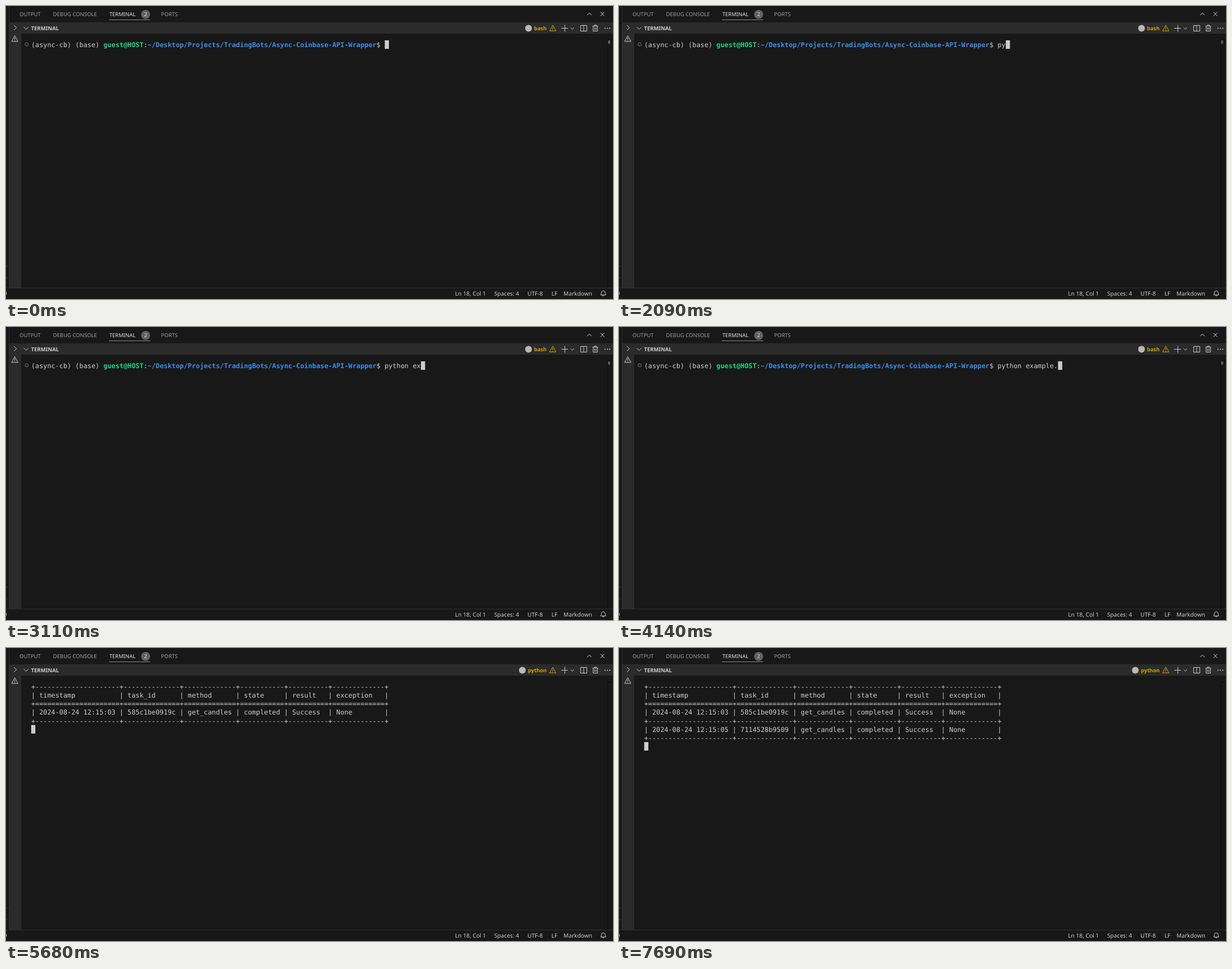
Recreate the animation shown at these times as an HTML page. Size 1078 by 520 pixels, loop 8000 ms.

```html
<!DOCTYPE html>
<html lang="en">
<head>
<meta charset="utf-8">
<title>Terminal session</title>
<style>
  html, body { margin: 0; width: 100%; height: 100%; overflow: hidden; background: #181818; }
  svg { display: block; width: 100vw; height: 100vh; }
  text { font-family: "Noto Sans", "Open Sans", sans-serif; text-rendering: geometricPrecision; white-space: pre; fill: #ccc; }
  .tabs text { font-size: 9.5px; fill: #9d9d9d; }
  .tabs .active { fill: #e0e0e0; }
  .title, .task text { font-size: 9.5px; font-weight: 700; }
  .task text { font-size: 9.3px; fill: #cca700; text-anchor: end; }
  .status text { font-size: 10.16px; }
  .screen text { font-family: "DejaVu Sans Mono", monospace; font-size: 11.853px; }
  .host { fill: #23d18b; font-weight: 700; }
  .path { fill: #3b8eea; font-weight: 700; }
  .icon { fill: none; stroke: #ccc; stroke-width: 1; }
  .yellow { stroke: #cca700; }
</style>
</head>
<body>
<svg viewBox="0 0 1078 520">
  <defs>
    <path id="warn" d="M0-5.3L5.6 4.9H-5.6ZM0-2V1.7M0 2.7V3.8" stroke-linejoin="round"/>
  </defs>

  <!-- panel frame -->
  <rect width="1078" height="520" fill="#181818"/>
  <path d="M5.5 0V500M0 500.5H1078M0 461.5H5M0 482.5H5" stroke="#2f2f2f" fill="none"/>
  <rect x="6" y="29" width="1072" height="20" fill="#2b2b2b"/>
  <rect x="6" y="49" width="21" height="451" fill="#2b2b2b"/>
  <path d="M1068.5 60V500M1068 60.5H1078" stroke="#0c0c0c" fill="none"/>
  <path class="icon" d="M-1 506Q2.2 510-1 514"/>

  <g class="tabs">
    <text x="24" y="17.8">OUTPUT</text>
    <text x="83.5" y="17.8">DEBUG CONSOLE</text>
    <text x="183.5" y="17.8" class="active">TERMINAL</text>
    <text x="275.5" y="17.8">PORTS</text>
    <circle cx="248" cy="15" r="8" fill="#616161"/>
    <text x="248" y="18.4" class="active" text-anchor="middle">2</text>
    <path d="M183 24.5H256" stroke="#8c8c8c"/>
  </g>
  <path class="icon" d="M1032 16.3L1036 12.2L1040 16.3M1055.7 10.7L1062.7 17.7M1062.7 10.7L1055.7 17.7"/>

  <!-- section header -->
  <path class="icon" d="M14.2 34.3L18.6 38.5L14.2 42.7M31.5 37.3L35.6 41.4L39.7 37.3"/>
  <use href="#warn" class="icon" x="15.6" y="58"/>
  <text class="title" x="44.5" y="42.6">TERMINAL</text>
  <g class="task">
    <circle id="shell" cy="39.5" r="6" fill="#b8b8b8"/>
    <text id="label" x="960" y="42.6"></text>
    <use href="#warn" class="icon yellow" x="971" y="39.3"/>
  </g>
  <path class="icon" d="M986 39.5H998M992.5 33.5V45.5M1002.7 38.3L1005.7 41.2L1008.7 38.3"/>
  <path class="icon" d="M1020.5 34.5H1031.5V44.5H1020.5ZM1026 34.5V44.5"/>
  <path class="icon" d="M1041.5 35.8H1051.7M1044.8 35.8V33.9H1048.4V35.8M1042.8 36V44.6H1050.4V36M1045.3 38V42.6M1047.9 38V42.6"/>
  <g fill="#ccc"><circle cx="1063.7" cy="39.5" r="1"/><circle cx="1068" cy="39.5" r="1"/><circle cx="1072.3" cy="39.5" r="1"/></g>

  <!-- terminal -->
  <g class="screen">
    <g id="prompt">
      <circle cx="36.7" cy="68" r="2.9" fill="none" stroke="#747474"/>
      <rect x="1069" y="61" width="4" height="6" fill="#595959"/>
      <text x="44.7" y="73">(async-cb) (base) <tspan class="host">guest@HOST</tspan>:<tspan class="path">~/Desktop/Projects/TradingBots/Async-Coinbase-API-Wrapper</tspan>$ <tspan id="typed"></tspan></text>
    </g>
    <g id="table"></g>
    <rect id="cursor" width="7.4" height="15.1" fill="#ccc"/>
  </g>

  <g class="status">
    <text x="797.5" y="513.6">Ln 18, Col 1</text>
    <text x="867" y="513.6">Spaces: 4</text>
    <text x="926" y="513.6">UTF-8</text>
    <text x="968.8" y="513.6">LF</text>
    <text x="990" y="513.6">Markdown</text>
    <path class="icon" d="M1056 512.8Q1057.3 511.5 1057.3 508.8A3.4 3.4 0 0 1 1064.1 508.8Q1064.1 511.5 1065.4 512.8ZM1059.2 513A1.5 1.5 0 0 0 1062.2 513"/>
  </g>
</svg>
<script>
const LOOP = 8000, LEFT = 44.7, TOP = 60.9, CELL = 7.136, LINE = 15.15, PROMPT = 88;
const COMMAND = 'python example.py';
// Moment at which each character of the command appears.
const KEYS = [2090, 2090, 2240, 2410, 2550, 2700, 2870, 2900, 3110, 3180, 3380, 3500, 3610, 3820, 4140, 4600, 4690];
const ENTER = 5290, RENAMED = 5410, CLEARED = 5480, FIRST = 5680, SECOND = 7490, DONE = 7690;

const WIDTHS = [21, 14, 13, 11, 10, 13];
const HEADER = ['timestamp', 'task_id', 'method', 'state', 'result', 'exception'];
const entry = (second, id, ...state) => ['2024-08-24 12:15:' + second, id, 'get_candles', ...state];
const SUCCESS = ['completed', 'Success', 'None'];
const PENDING = ['pending', 'Pending', 'Pending'];

const $ = id => document.getElementById(id);
const rule = mark => '+' + WIDTHS.map(w => mark.repeat(w) + '+').join('');
const row = cells => '|' + cells.map((c, i) => (' ' + c).padEnd(WIDTHS[i]) + '|').join('');

function tableLines(t) {
  if (t < FIRST) return [];
  const lines = [rule('-'), row(HEADER), rule('='), row(entry('03', '585c1be0919c', ...SUCCESS)), rule('-')];
  if (t >= SECOND) lines.push(row(entry('05', '7114528b9509', ...(t < DONE ? PENDING : SUCCESS))), rule('-'));
  return lines;
}

function draw(t) {
  const count = KEYS.filter(k => t >= k).length;
  const lines = tableLines(t);
  const renamed = t >= RENAMED;

  $('typed').textContent = COMMAND.slice(0, count);
  $('prompt').style.display = t < CLEARED ? '' : 'none';
  $('label').textContent = renamed ? 'python' : 'bash';
  $('shell').setAttribute('cx', renamed ? 917 : 928);
  $('table').innerHTML = lines
    .map((s, i) => `<text x="${LEFT}" y="${73 + i * LINE}">${s}</text>`).join('');

  const column = t < ENTER ? PROMPT + count : 0;
  const line = t < ENTER ? 0 : lines.length || 1;
  $('cursor').setAttribute('x', LEFT + column * CELL);
  $('cursor').setAttribute('y', TOP + line * LINE);
}

let last = '';
function tick() {
  const t = performance.now() % LOOP;
  const key = [...KEYS, ENTER, RENAMED, CLEARED, FIRST, SECOND, DONE].filter(k => t >= k).length;
  if (key !== last) draw(t);
  last = key;
  requestAnimationFrame(tick);
}
tick();
</script>
</body>
</html>
```
